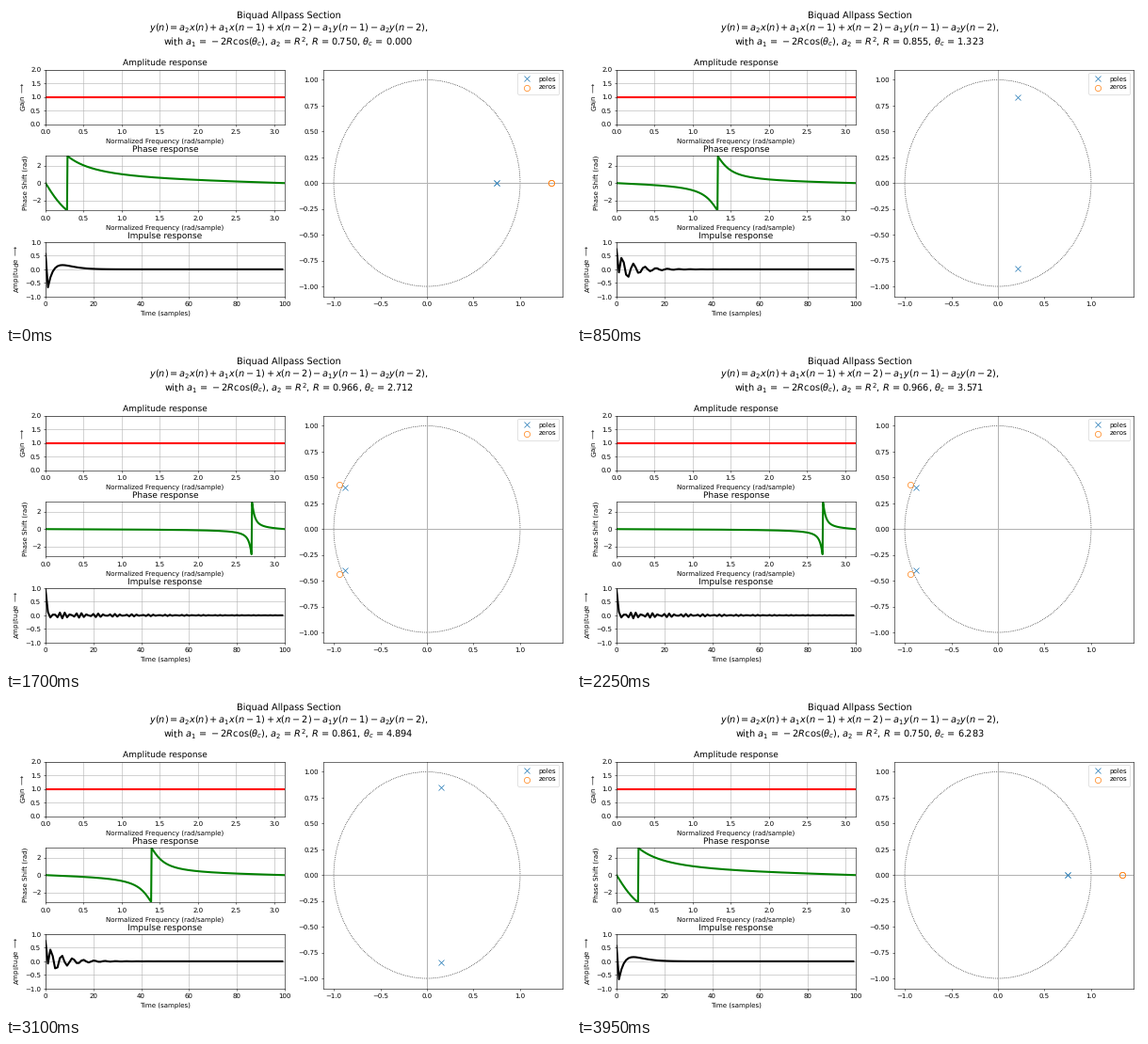
Recreate the animation shown at these times as a matplotlib script. Size 600 by 338 pixels, loop 4 s.

```python
import numpy as np
import matplotlib.pyplot as plt
from matplotlib.animation import FuncAnimation
from matplotlib.patches import Circle

W, H, DPI = 600, 338, 50
FRAMES, STEPS = 80, 96
ROW_TOP, ROW_H, ROW_PITCH = 67.5, 58.2, 91.65

plt.rcParams.update({"font.family": "DejaVu Sans", "font.size": 10,
                     "axes.titlesize": 13, "text.hinting": "none"})

fig = plt.figure(figsize=(W / DPI, H / DPI), dpi=DPI, facecolor="white")


def add_axes(x0, x1, top, height):
    return fig.add_axes([x0 / W, 1 - (top + height) / H, (x1 - x0) / W, height / H])


def response(row, title, xlabel, ylabel, xlim, ylim, xticks, yticks, color):
    """Left-hand panel with one thick curve; returns the curve."""
    ax = add_axes(42, 296, ROW_TOP + row * ROW_PITCH, ROW_H)
    ax.set(title=title, xlabel=xlabel, ylabel=ylabel, xlim=xlim, ylim=ylim,
           xticks=xticks, yticks=yticks)
    ax.grid(True)
    return ax.plot([], [], color=color, lw=3)[0]


def heading(baseline, text=""):
    return fig.text(0.5, 1 - baseline / H, text, size=14, ha="center", va="baseline")


FREQ = "Normalized Frequency (rad/sample)"
freq_ticks = np.arange(0, 3.1, 0.5)
amp = response(0, "Amplitude response", FREQ, r"Gain $\longrightarrow$",
               (0, np.pi), (0, 2), freq_ticks, np.arange(0, 2.1, 0.5), "red")
phase = response(1, "Phase response", FREQ, "Phase Shift (rad)",
                 (0, np.pi), (-np.pi, np.pi), freq_ticks, [-2, 0, 2], "green")
impulse = response(2, "Impulse response", "Time (samples)",
                   r"Amplitude $\longrightarrow$",
                   (0, 100), (-1, 1), np.arange(0, 101, 20),
                   np.arange(-1, 1.1, 0.5), "black")

# Pole-zero plane
plane = add_axes(336.5, 590.5, ROW_TOP, 2 * ROW_PITCH + ROW_H)
plane.add_patch(Circle((0, 0), 1, fill=False, color="black", ls="dotted", lw=1))
plane.axvline(0, color="0.7")
plane.axhline(0, color="0.7")
poles, = plane.plot([], [], "x", ms=9, color="C0", label="poles")
zeros, = plane.plot([], [], "o", ms=9, color="C1", mfc="none", label="zeros")
plane.set(xlim=(-1.1167, 1.45), ylim=(-1.1, 1.1),
          xticks=np.arange(-1, 1.1, 0.5), yticks=np.arange(-1, 1.1, 0.25))
plane.legend(loc="upper right")

heading(13, "Biquad Allpass Section")
heading(26, r"$y(n) = a_2 x(n) + a_1 x(n-1) + x(n-2) - a_1 y(n-1) - a_2 y(n-2)$,")
params = heading(41.6)

w = np.linspace(0, np.pi, 512, endpoint=False)
delay = np.exp(-1j * w)
samples = np.arange(100)


def allpass_impulse(a1, a2):
    feed = [a2, a1, 1]
    h = np.zeros(len(samples))
    for n in samples:
        h[n] = feed[n] if n < 3 else 0
        if n > 0:
            h[n] -= a1 * h[n - 1]
        if n > 1:
            h[n] -= a2 * h[n - 2]
    return h


def update(i):
    # 96 angle steps sampled at 80 frames
    theta = 2 * np.pi * round(i * STEPS / FRAMES) / (STEPS - 1)
    r = 1 - 0.25 * abs(np.pi - theta) / np.pi
    a1, a2 = -2 * r * np.cos(theta), r * r

    resp = (a2 + a1 * delay + delay**2) / (1 + a1 * delay + a2 * delay**2)
    amp.set_data(w, np.abs(resp))
    phase.set_data(w, np.angle(resp))
    impulse.set_data(samples, allpass_impulse(a1, a2))

    pair = np.exp(1j * theta * np.array([1, -1]))
    for marks, radius in ((poles, r), (zeros, 1 / r)):
        marks.set_data(radius * pair.real, radius * pair.imag)

    params.set_text(r"with $a_1$ = ${}-2R\cos(\theta_c)$, $a_2$ = $R^2$, "
                    rf"$R$ = {r:.3f}, $\theta_c$ = {theta:.3f}")
    return amp, phase, impulse, poles, zeros, params


anim = FuncAnimation(fig, update, frames=FRAMES, interval=50, repeat=True,
                     repeat_delay=0, blit=False)
plt.show()
```
